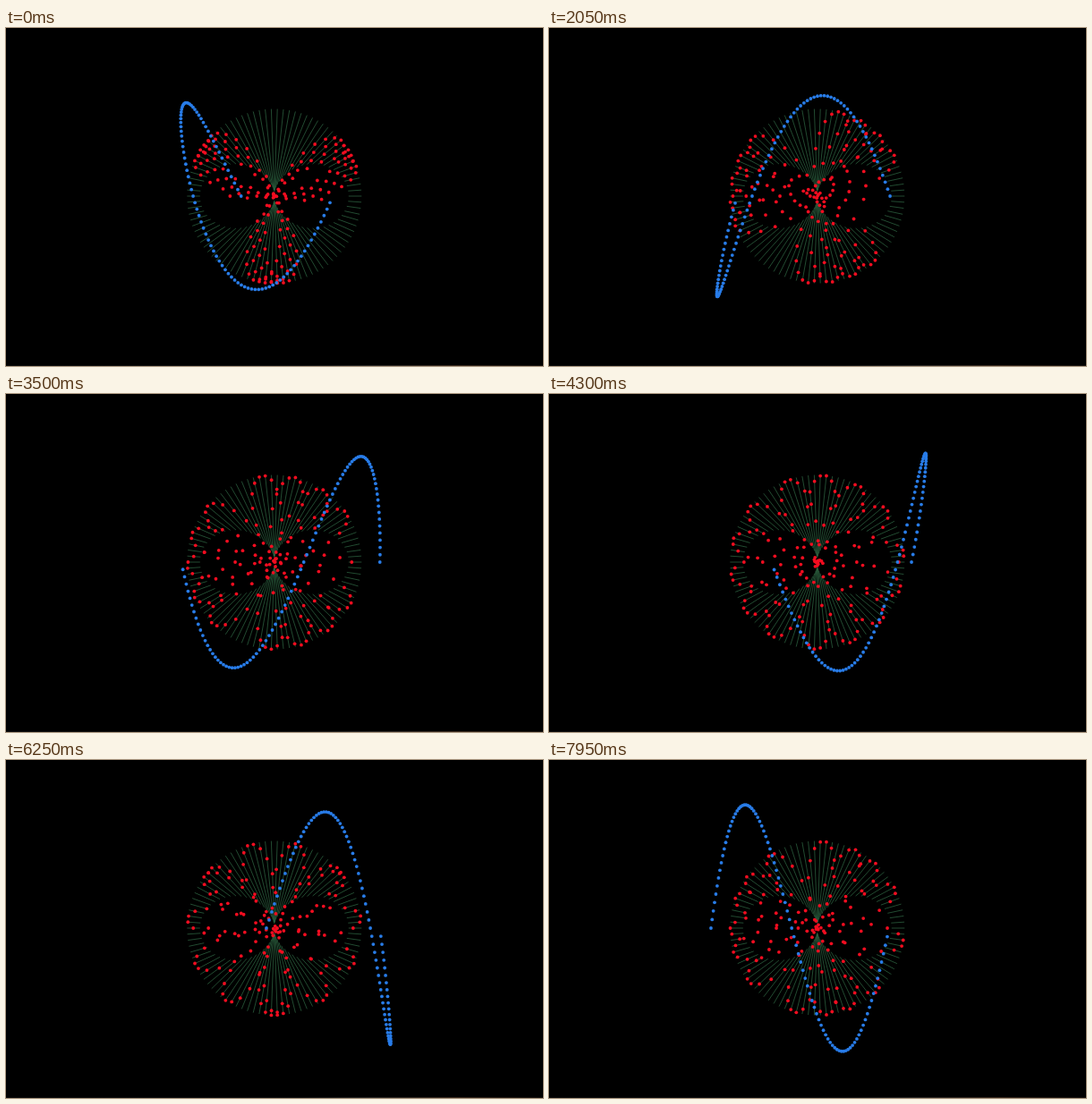
An HTML page with a canvas for the animation above (8000 ms loop, 600x378 px).

```html
<!DOCTYPE html>
<html lang="en">
<head>
<meta charset="utf-8">
<title>Rose and Lissajous</title>
<style>
  html, body { margin: 0; width: 100%; height: 100%; overflow: hidden; background: #000; }
  canvas { display: block; }
</style>
</head>
<body>
<canvas id="stage" width="600" height="378"></canvas>
<script>
const ctx = document.getElementById('stage').getContext('2d');
const LOOP = 8000, STEP = 50;
const CX = 299.8, CY = 188, RADIUS = 97.5;
const rad = degrees => degrees * Math.PI / 180;

function dot(x, y, color) {
  ctx.fillStyle = color;
  ctx.beginPath();
  ctx.arc(CX + x, CY + y, 1.9, 0, 2 * Math.PI);
  ctx.fill();
}

// Radial lines that leave two lens-shaped gaps left and right.
function drawRays() {
  ctx.strokeStyle = '#3f8a5a';
  ctx.lineWidth = 0.55;
  ctx.beginPath();
  for (let i = 0; i < 90; i++) {
    const c = Math.cos(rad(4 * i)), s = Math.sin(rad(4 * i));
    const inner = 5 + 78 * Math.abs(c) ** 1.6;
    ctx.moveTo(CX + inner * c, CY + inner * s);
    ctx.lineTo(CX + RADIUS * c, CY + RADIUS * s);
  }
  ctx.stroke();
}

// Two turns of a rose curve whose petal frequency rises with time.
function drawRose(t) {
  const step = 12.421 + 0.3365 * t;
  for (let i = 1; i <= 180; i++) {
    const r = RADIUS * Math.sin(rad(45.3 - step * i));
    dot(r * Math.cos(rad(4 * i)), r * Math.sin(rad(4 * i)), '#f30d20');
  }
}

// One full wave vertically; horizontal phase and frequency drift.
function drawWave(t) {
  const size = 104.5 + 3.7 * t + 0.062 * t * t;
  const phase = 110.8 - 32.75 * t;
  const step = 2.199 - 0.1285 * t - 0.0019 * t * t;
  for (let i = 0; i < 90; i++) {
    dot(size * Math.cos(rad(phase + step * i)), -size * Math.sin(rad(4 * i)), '#287ce8');
  }
}

function drawBottomEdge() {
  const edge = ctx.createLinearGradient(0, 0, 600, 0);
  edge.addColorStop(0, '#0c0c0c');
  edge.addColorStop(0.55, '#141414');
  edge.addColorStop(0.68, '#2c2a28');
  edge.addColorStop(0.84, '#3a2a1e');
  edge.addColorStop(1, '#15110e');
  ctx.fillStyle = edge;
  ctx.fillRect(0, 377, 600, 1);
}

function frame() {
  const t = Math.floor(performance.now() % LOOP / STEP) * STEP / 1000;
  ctx.fillStyle = '#000';
  ctx.fillRect(0, 0, 600, 378);
  drawBottomEdge();
  drawRays();
  drawRose(t);
  drawWave(t);
  requestAnimationFrame(frame);
}
frame();
</script>
</body>
</html>
```
